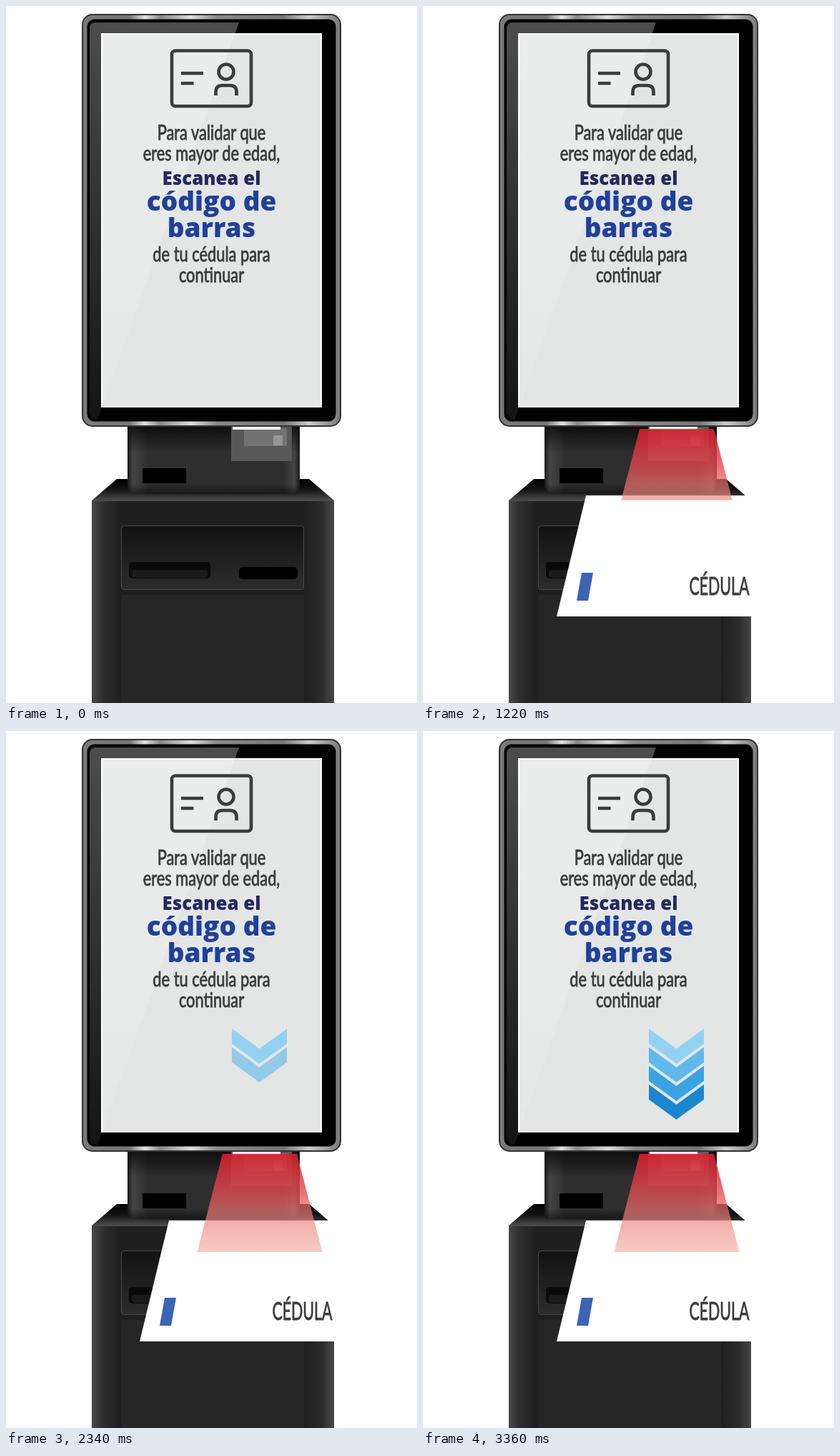
Animation, 575 px wide and 974 px high, one loop 3380 ms. Source, as an HTML page:

```html
<!DOCTYPE html>
<html lang="es">
<head>
<meta charset="utf-8">
<title>Validación de edad</title>
<style>
  html, body { margin: 0; width: 100%; height: 100%; overflow: hidden; background: #fff; }
  svg { display: block; width: 100%; height: 100%; }
  text { text-anchor: middle; }
  .narrow { font: 28px Lato, sans-serif; fill: #3d3d3d; stroke: #3d3d3d; stroke-width: .9; }
  .heavy { font: 800 37px "Open Sans", sans-serif; fill: #21409a; }
  .icon { fill: none; stroke: #3b3b3b; stroke-width: 4.6; }
</style>
</head>
<body>
<svg viewBox="0 0 575 974">
  <defs>
    <linearGradient id="metal" x2="1" y2="0">
      <stop offset="0" stop-color="#7a7a7a"/><stop offset=".18" stop-color="#777"/>
      <stop offset=".24" stop-color="#e2e2e2"/><stop offset=".3" stop-color="#888"/>
      <stop offset=".42" stop-color="#ddd"/><stop offset=".52" stop-color="#8a8a8a"/>
      <stop offset=".78" stop-color="#777"/><stop offset=".88" stop-color="#ccc"/>
      <stop offset="1" stop-color="#7a7a7a"/>
    </linearGradient>
    <linearGradient id="gloss" x2="0" y2="1">
      <stop offset="0" stop-color="#fff" stop-opacity=".3"/>
      <stop offset="1" stop-color="#fff" stop-opacity=".08"/>
    </linearGradient>
    <linearGradient id="neck" x2="1" y2="0">
      <stop offset="0" stop-color="#1a1a1a"/><stop offset=".03" stop-color="#444"/>
      <stop offset=".12" stop-color="#2e2e2e"/><stop offset=".9" stop-color="#2e2e2e"/>
      <stop offset=".97" stop-color="#444"/><stop offset="1" stop-color="#1a1a1a"/>
    </linearGradient>
    <linearGradient id="shade" x2="0" y2="1">
      <stop offset="0" stop-opacity=".75"/><stop offset=".4" stop-opacity="0"/>
      <stop offset=".85" stop-opacity="0"/><stop offset="1" stop-opacity=".5"/>
    </linearGradient>
    <linearGradient id="ledge" x2="0" y2="1">
      <stop offset="0" stop-color="#000"/><stop offset=".5" stop-color="#141414"/>
      <stop offset="1" stop-color="#4c4c4c"/>
    </linearGradient>
    <linearGradient id="body" x2="1" y2="0">
      <stop offset="0" stop-color="#484848"/><stop offset=".05" stop-color="#2c2c2c"/>
      <stop offset=".12" stop-color="#1f1f1f"/><stop offset=".88" stop-color="#1f1f1f"/>
      <stop offset=".95" stop-color="#2c2c2c"/><stop offset="1" stop-color="#484848"/>
    </linearGradient>
    <linearGradient id="panel" x2="0" y2="1">
      <stop offset="0" stop-color="#121212"/><stop offset="1" stop-color="#2c2c2c"/>
    </linearGradient>
    <linearGradient id="light" gradientUnits="userSpaceOnUse" x1="0" y1="591" x2="0" y2="728">
      <stop offset="0" stop-color="#da1f2d" stop-opacity=".88"/>
      <stop offset=".4" stop-color="#e24c53" stop-opacity=".78"/>
      <stop offset=".7" stop-color="#ea8a84" stop-opacity=".68"/>
      <stop offset="1" stop-color="#f09a8c" stop-opacity=".52"/>
    </linearGradient>
    <path id="column" d="M170 585H411V674q0 8-8 8H178q-8 0-8-8Z"/>
  </defs>

  <!-- base -->
  <path d="M155 661H424L459 691H120Z" fill="url(#ledge)"/>
  <path d="M120 691H459V974H120Z" fill="url(#body)"/>
  <path d="M121 691.5H458" stroke="#4c4c4c"/>
  <rect x="161.5" y="726.5" width="255" height="89" rx="4" fill="url(#panel)" stroke="#4a4a4a"/>
  <rect x="172" y="777" width="114" height="23" rx="5" fill="#0a0a0a"/>
  <rect x="176" y="788" width="106" height="11" rx="4" fill="#1b1b1b"/>
  <rect x="326" y="784" width="82" height="17" rx="5"/>
  <rect x="161" y="823" width="256" height="151" rx="3" fill="#262626"/>

  <!-- neck and printer -->
  <use href="#column" fill="url(#neck)"/>
  <use href="#column" fill="url(#shade)"/>
  <rect x="191" y="646" width="61" height="21"/>
  <rect x="315" y="588" width="85" height="48" fill="#585858"/>
  <rect x="333" y="590" width="60" height="25" fill="#727272"/>
  <rect x="374" y="600" width="13" height="14" fill="#969696"/>
  <rect x="317" y="587" width="67" height="5" fill="#f2f2f2"/>

  <!-- screen -->
  <rect x="106" y="11" width="363" height="577" rx="15" fill="#333"/>
  <rect x="108" y="13" width="359" height="573" rx="13" fill="url(#metal)"/>
  <rect x="113.5" y="18.5" width="348" height="562" rx="10"/>
  <rect x="134" y="39" width="307" height="521" fill="#e3e6e5" stroke="#fff" stroke-width="2"/>
  <path d="M125 23H326L128 578Q117 578 117 566V32Q117 23 125 23Z" fill="url(#gloss)"/>

  <g class="icon">
    <rect x="232" y="62.5" width="111" height="77.500" rx="5"/>
    <path d="M245 94H276M245 108H262.5M293.5 125V120q0-9 9-9h11q9 0 9 9v5"/>
    <circle cx="308" cy="92" r="10.5"/>
  </g>

  <g class="narrow">
    <text transform="translate(287.5 187) scale(.78 1)">Para validar que</text>
    <text transform="translate(287.5 216) scale(.78 1)">eres mayor de edad,</text>
    <text transform="translate(287.5 357) scale(.78 1)">de tu cédula para</text>
    <text transform="translate(287.5 386) scale(.78 1)">continuar</text>
  </g>
  <g class="heavy">
    <text x="287.5" y="249.5" style="font-size:25.8px;fill:#25285f">Escanea el</text>
    <text x="287.5" y="286">código de</text>
    <text x="287.5" y="323">barras</text>
  </g>

  <g id="chevrons"></g>

  <g id="card">
    <path d="M228 684H460V853H187Z" fill="#fff"/>
    <path d="M222 792H238L231 831H215Z" fill="#3c64b4"/>
    <text class="narrow" transform="translate(414.5 823) scale(.63 1)" style="font-size:34px">CÉDULA</text>
  </g>

  <path id="beam" fill="url(#light)"/>
</svg>
<script>
const LOOP = 3380;
const STARTS = [570, 1404, 2212, 3040];   // when each run of chevrons begins
const COLORS = ['#93d1f2', '#5fb9ea', '#3aa3e2', '#1b86d0'];
const BEAM = { top: 591, height: 137, left: 303, right: 407, spread: 35.5 };

const $ = id => document.getElementById(id);
const ramp = (t, start, length) => Math.min(1, Math.max(0, (t - start) / length));

const chevrons = COLORS.map((color, i) => {
  const path = document.createElementNS('http://www.w3.org/2000/svg', 'path');
  path.setAttribute('d', `M316 ${416 + 26 * i}l38.5 28 38.5-28v21l-38.5 28-38.5-28z`);
  path.setAttribute('fill', color);
  return $('chevrons').appendChild(path);
});

// Every run rises and falls, except the last, which stays until the loop restarts.
const pulse = (t, inAt, inLength, outAt, outLength) => Math.max(...STARTS.map((start, k) => {
  const fall = k < STARTS.length - 1 ? ramp(t, start + outAt, outLength) : 0;
  return ramp(t, start + inAt, inLength) * (1 - fall);
}));

function drawBeam(reach) {
  const { top, height, left, right, spread } = BEAM;
  const bottom = top + height * reach;
  $('beam').setAttribute('d', reach
    ? `M${left} ${top}H${right}L${right + spread * reach} ${bottom}H${left - spread * reach}Z`
    : '');
}

function draw() {
  const t = performance.now() % LOOP;
  const rest = 1 - ramp(t, 50, 350);
  $('card').setAttribute('transform', `translate(${-5 * rest ** 3} ${140 * rest ** 3})`);
  $('card').setAttribute('opacity', 1 - rest ** 2);
  chevrons.forEach((path, i) =>
    path.setAttribute('opacity', pulse(t, 80 * i, 80, 160 + 65 * i, 240)));
  drawBeam(pulse(t, -510, 450, 130, 140));
  requestAnimationFrame(draw);
}
draw();
</script>
</body>
</html>
```
